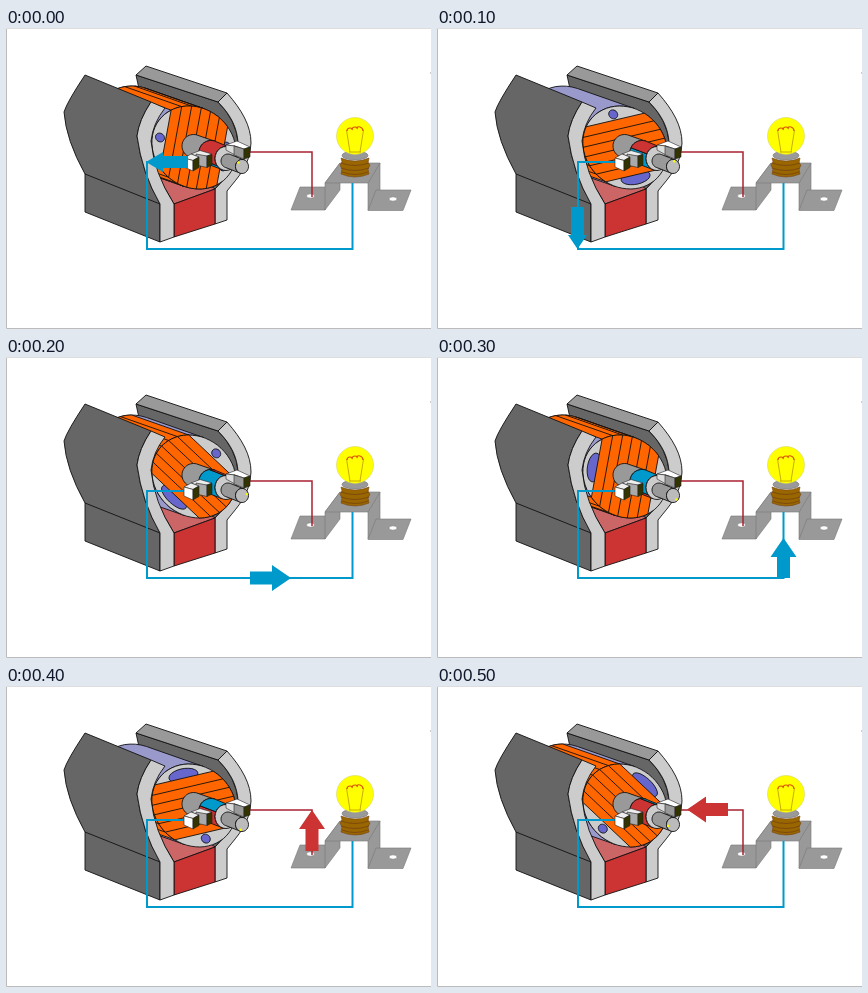
An HTML page for the animation above (0.6 s loop, 425 by 301 pixels).

```html
<!DOCTYPE html>
<html lang="en">
<head>
<meta charset="utf-8">
<title>Generator lighting a bulb</title>
<style>
html, body { margin: 0; width: 100%; height: 100%; overflow: hidden; background: #fff; }
svg { display: block; width: 425px; height: 301px; }
.ink { stroke: #111; stroke-width: .9; stroke-linejoin: round; }
.thin { stroke: #222; stroke-width: .6; stroke-linejoin: round; }
.soft { stroke: #777; stroke-width: .6; stroke-linejoin: round; }
.wire { fill: none; stroke-width: 2; }
</style>
</head>
<body>
<svg viewBox="0 0 425 301">
  <path d="M.5 0V300.5H425" fill="none" stroke="#bbb"/>
  <path d="M0 .5H425" stroke="#ddd"/>
  <path d="M424 45h1" stroke="#999"/>

  <!-- right pole, base and pole shoe -->
  <g class="ink">
    <path d="M130 47L212 74Q230 92 232 114Q228 143 209 161L150 145L133 61Z" fill="#666"/>
    <path d="M140 38L221 65L212 74L130 47Z" fill="#999"/>
    <path d="M221 65C236 82 245 98 245 115C244 138 232 149 221 163V192L209 196V161C224 146 232 134 232 114C231 101 226 88 212 74Z" fill="#ccc"/>
    <path d="M146 138L180 140L209 161L168 176Z" fill="#c66"/>
    <path d="M168 176L209 161V196L168 209Z" fill="#c33"/>
  </g>

  <g id="rotor" class="ink"></g>

  <!-- left pole -->
  <g class="ink">
    <path d="M79 47L145 74Q133 92 131 108Q136 145 154 176V214L79 184V146Q60 112 58 84Q61 74 79 47Z" fill="#666"/>
    <path d="M79 146L154 176" fill="none"/>
    <path d="M145 74L159 80Q147 95 145 113Q148 145 168 176V209L154 214V176Q136 145 131 108Q133 92 145 74Z" fill="#ccc"/>
  </g>

  <g id="shaft" class="ink"></g>

  <!-- bulb holder -->
  <g class="soft" fill="#999">
    <path d="M294 159H324L319 182H285Z"/>
    <path d="M319 182V155L334 135V162Z"/>
    <path d="M374 135L362 155V182L374 162Z"/>
    <path d="M370 162H405L397 182.500H362Z"/>
    <path d="M334 135H374L362 155H319Z"/>
    <ellipse cx="304.500" cy="168" rx="4" ry="2.200" fill="#fff"/>
    <ellipse cx="387" cy="171" rx="4" ry="2.200" fill="#fff"/>
  </g>
  <path d="M335 130Q349 136 363 130L362 135L364 137L362 141L363 146Q349 152 335 146L336 141L334 137L336 134Z" fill="#960" stroke="#741" stroke-width=".6"/>
  <path d="M335 135Q349 140 363 135M335 140Q349 145 363 140M336 144Q349 149 362 144" fill="none" stroke="#741" stroke-width=".8"/>
  <ellipse cx="349" cy="127.500" rx="13" ry="4.500" fill="#999" stroke="#777" stroke-width=".6"/>
  <circle cx="349" cy="108" r="18.500" fill="#ff0" stroke="#cc6" stroke-width=".5"/>
  <path d="M344 124L340.500 102M354 124L357.500 102M343 124H355" fill="none" stroke="#b90" stroke-width=".8"/>
  <path d="M341 103q0-3 3-3t2 2q0-3 3-3t2 2q0-3 3-2t3 4" fill="none" stroke="#d50" stroke-width="1.200"/>

  <path class="wire" d="M182 134H141V221H346.500V155" stroke="#09c"/>
  <path class="wire" d="M244 124H306V169" stroke="#a23" style="stroke-width:1.500"/>

  <!-- brushes -->
  <g class="thin">
    <path d="M185 126L194 122.500L206 126L201 128L193 129Z" fill="#eee"/>
    <path d="M190 126L201 128V139.500L190 137Z" fill="#aaa"/>
    <path d="M201 128L206 126.500V137L201 139.500Z" fill="#330"/>
    <path d="M178 130L185 126L193 129L187 132.500Z" fill="#eee"/>
    <path d="M178 130L187 132.500V143L178 139Z" fill="#fff"/>
    <path d="M187 132.500L193 129V139.500L187 143Z" fill="#330"/>
    <path d="M220 117L231 113L244 119L238 121L229 118Z" fill="#fff"/>
    <path d="M220 117L229 118V127L220 122Z" fill="#ddd"/>
    <path d="M228 118L238 121V131L228 127Z" fill="#999"/>
    <path d="M238 121L244 119V129L238 131Z" fill="#330"/>
  </g>
  <path id="arrow"/>
</svg>
<script>
const STEP = 100, COUNT = 6, RAD = Math.PI / 180;
const rotor = document.getElementById('rotor');
const shaft = document.getElementById('shaft');
const arrow = document.getElementById('arrow');

const ORANGE = '#f60', SLOT = '#66c', RED = '#c33', BLUE = '#09c';
const RIM = 1.22, COIL = .83, BACK = [-57, -20];

// Circle coordinates on the tilted rotor face
const face = (x, y) => [188 - 34 * x + 6 * y, 119.5 - 10 * x - 32.5 * y];
const behind = p => [p[0] + BACK[0], p[1] + BACK[1]];
const rim = a => face(RIM * Math.cos(a * RAD), RIM * Math.sin(a * RAD));
const turn = (x, y, a) => {
  const c = Math.cos(a * RAD), s = Math.sin(a * RAD);
  return face(x * c - y * s, x * s + y * c);
};

const fmt = p => p[0].toFixed(1) + ' ' + p[1].toFixed(1);
const path = (pts, fill) =>
  `<path d="M${pts.map(fmt).join('L')}${fill === 'none' ? '' : 'Z'}" fill="${fill}"/>`;
const sweep = (a, b, f, n = 24) =>
  Array.from({ length: n + 1 }, (_, i) => f(a + (b - a) * i / n));
const side = (a, b, near, far, fill) =>
  path([...sweep(a, b, near), ...sweep(b, a, far)], fill);

// Part of the rotor rim whose side faces the viewer
const SEEN = [-87, 93];

function drawRotor(a) {
  const far = t => behind(rim(t));
  let out = side(...SEEN, rim, far, '#99c') + path(sweep(0, 360, rim, 60), '#ccc');

  const slot = (x, rx, ry) =>
    path(sweep(0, 360, t => turn(x + rx * Math.cos(t * RAD), ry * Math.sin(t * RAD), a)), SLOT);
  out += slot(1, .13, .13) + slot(-.9, .2, .44);

  const edge = Math.acos(COIL / RIM) / RAD;
  const cuts = Array.from({ length: 5 }, (_, i) => COIL * ((i + 1) / 3 - 1));
  for (const half of [0, 180]) {
    for (const full of [-360, 0, 360]) {
      const base = a + half + full;
      const from = Math.max(base + edge, SEEN[0]);
      const to = Math.min(base + 180 - edge, SEEN[1]);
      if (from >= to) continue;
      out += side(from, to, rim, far, ORANGE);
      for (const x of cuts) {
        const t = base + Math.acos(x / RIM) / RAD;
        if (t > from && t < to) out += path([rim(t), far(t)], 'none');
      }
    }
  }

  const ends = h => sweep(a + h + edge, a + h + 180 - edge, rim);
  out += path([...ends(0), ...ends(180)], ORANGE);
  for (const x of cuts) {
    const y = Math.sqrt(RIM * RIM - x * x);
    out += path([turn(x, -y, a), turn(x, y, a)], 'none');
  }
  rotor.innerHTML = out;
}

const ring = (x, y, rx, ry) => t => [x + rx * Math.cos(t * RAD), y + ry * Math.sin(t * RAD)];
const disc = (f, fill) => path(sweep(0, 360, f), fill);

function drawShaft(n) {
  const left = 113, right = 293;
  const hub = ring(187.5, 118, 11.5, 11.5), mid = ring(205, 124.5, 12, 12);
  const front = ring(220, 130.5, 11, 12);
  const root = ring(222, 133, 7, 7), tip = ring(236, 138.5, 6.5, 7);
  const split = 143 + 60 * (n % 3);
  const [low, high] = n < 3 ? [BLUE, RED] : [RED, BLUE];
  const mark = ring(236, 138.5, 5, 5.5)(45 + 60 * (n - 3));

  shaft.innerHTML =
    side(left, right, mid, hub, '#999') +
    side(left, split, front, mid, low) +
    side(split, right, front, mid, high) +
    disc(front, '#ccc') +
    side(left, right, tip, root, '#999') +
    disc(tip, '#bbb') +
    `<circle cx="${mark[0]}" cy="${mark[1]}" r="1.2" fill="#ff0" stroke="none"/>`;
}

// Tip x, y, heading, length, head length, half widths of head and body, colour
const arrows = [
  [140, 134, 180, 42, 17, 10, 6, BLUE],
  [140.5, 221, 90, 42, 14, 9.5, 6.5, BLUE],
  [285, 221, 0, 41, 19, 13, 6.5, BLUE],
  [346.5, 181, -90, 40, 19, 13, 6.5, BLUE],
  [306, 124, -90, 41, 19, 13, 6.5, RED],
  [250, 123.5, 180, 41, 19, 13, 6.5, RED]
];

function drawArrow(n) {
  const [x, y, dir, len, head, wide, thin, fill] = arrows[n];
  arrow.setAttribute('d',
    `M0 0L${-head} ${wide}V${thin}H${-len}V${-thin}H${-head}V${-wide}Z`);
  arrow.setAttribute('transform', `translate(${x} ${y}) rotate(${dir})`);
  arrow.setAttribute('fill', fill);
}

let shown = -1;
function render(ms) {
  const n = Math.floor(ms / STEP) % COUNT;
  if (n !== shown) {
    shown = n;
    drawRotor(n * 60);
    drawShaft(n);
    drawArrow(n);
  }
}

const start = performance.now();
function tick() {
  render(performance.now() - start);
  requestAnimationFrame(tick);
}
tick();
</script>
</body>
</html>
```
